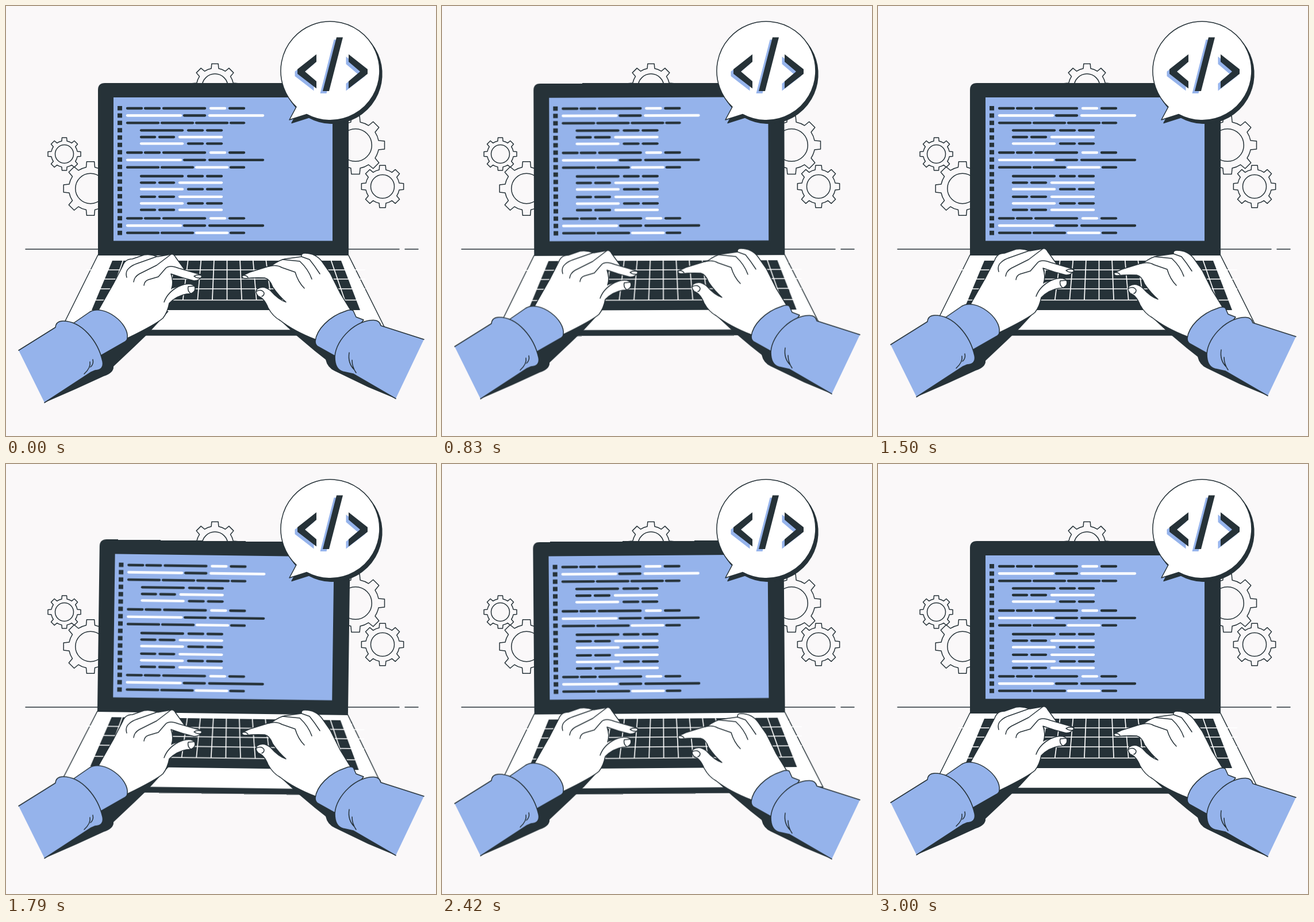
Animation of 748 by 748 pixels, one loop 3040 ms. Source, as an HTML page:

```html
<!DOCTYPE html>
<html lang="en">
<head>
<meta charset="utf-8">
<title>Typing code on a laptop</title>
<style>
  :root { --ink: #263238; --blue: #95b3eb; --paper: #faf8f9; }
  html, body { margin: 0; width: 100%; height: 100%; overflow: hidden; background: var(--paper); }
  svg { display: block; width: 100%; height: 100%; }
  .line { fill: none; stroke: var(--ink); stroke-width: 1.5; stroke-linecap: round; stroke-linejoin: round; }
  .ink { fill: var(--ink); }
  .blue { fill: var(--blue); }
  .white { fill: #fff; }
  .outlined { stroke: var(--ink); stroke-width: 1.5; stroke-linejoin: round; }
  .grid { fill: none; stroke: #fff; stroke-width: 1.7; }
  .code { stroke-width: 4.3; stroke-linecap: round; }

  #laptop, #left, #right { animation: 3.04s linear infinite; }
  #laptop { transform-origin: 378px 353px; animation-name: sway; }
  #left { animation-name: tap-left; }
  #right { animation-name: tap-right; }

  @keyframes sway {
    0%, 98.684%, 100% { transform: rotate(0deg); }
    12.336%, 61.678% { transform: rotate(1deg); }
    37.007%, 86.349% { transform: rotate(-1deg); }
  }
  @keyframes tap-left {
    0%, 16.447%, 65.789% { transform: translateY(0); }
    41.118%, 90.461% { transform: translateY(-15px); }
    98.684%, 100% { transform: translateY(-10px); }
  }
  @keyframes tap-right {
    0%, 98.684%, 100% { transform: translateY(0); }
    32.895% { transform: translateY(-10px); }
    82.237% { transform: translateY(5px); }
  }
</style>
</head>
<body>
<svg viewBox="0 0 748 748">
  <defs>
    <path id="balloon" d="M505 175.500 A86 86 0 1 1 523 188.500 L493 198 Z"/>
    <g id="tag">
      <path d="M540 84 V97 L520 114 L540 131 V143.500 L507 118 V110 Z"/>
      <path d="M575 54.500 H586 L562 148 H551 Z"/>
      <path d="M596 84 L629 110 V118 L596 143.500 V131 L616 114 L596 97 Z"/>
    </g>
  </defs>

  <path class="line" d="M34 423 H684 M694 423 H717"/>
  <g id="gears"></g>

  <g id="laptop">
    <path class="white outlined" d="M160 433 H595.500 L661 564 H95 Z"/>
    <path class="ink" d="M95 564 H661 V569 Q660 573.500 655 573.500 H101 Q95 573 95 569 Z"/>
    <path class="ink" d="M185 443 H583 L616 529 H149 Z"/>
    <path class="grid" id="keys"/>
    <path class="ink" d="M160 434 V146 Q160 134 172 134 H584 Q596 134 596 146 V434 Z"/>
    <path class="blue" d="M187 159 H568 V408.500 H187 Z"/>
    <g id="code"></g>
  </g>

  <use href="#balloon" class="ink outlined" x="4" y="5.500"/>
  <use href="#balloon" class="white outlined"/>
  <use href="#tag" class="blue" x="-4.500" y="4"/>
  <use href="#tag" class="ink"/>

  <g id="left">
    <path class="ink" d="M67 690 L122 666 L170 644 Q188 638 187 627 L222 594 L247 570 L283 531 L270 530 L205 560 L150 628 Z"/>
    <path class="white" d="M160 532 L187 483 L203 452 Q207 440 220 440 L240 433 Q252 431 264 436 L287 432 Q292 431 295 437 L311 459 L338 467 Q343 470 338 474 Q333 478 327 478 Q306 473 287 466 Q292 480 288 492 L300 488 Q316 481 325 485 Q331 488 328 495 Q325 501 314 501 Q297 504 284 517 Q281 533 273 543 Q262 553 211 578 Z"/>
    <path class="line" d="M160 530 L187 483 L203 452 Q207 440 220 440 L240 433 Q252 431 264 436 L287 432 Q292 431 295 437 L311 459"/>
    <path class="line" d="M240 486 Q241 478 248 476 L265 471 L278 456 Q285 450 300 456 L338 467 Q343 470 338 474 Q333 478 327 478 Q306 473 287 466 Q292 480 288 492"/>
    <path class="line" d="M210 472 Q207 462 214 456 Q219 451 228 448 L262 436 M222 480 Q223 471 232 466 L262 451 L287 432"/>
    <path class="line" d="M275 515 Q281 498 300 488 Q316 481 325 485 Q331 488 328 495 Q325 501 314 501 Q297 504 284 517 Q281 533 273 543 Q262 553 211 578"/>
    <path class="line" d="M341 469 Q333 466 327 470 Q332 474 339 473 M329 487 L317 488 Q315 495 321 500"/>
    <path class="blue outlined" d="M117 552 L146 532 C170 518 215 552 211 578 Q211 581 207 584 L165 608 Z"/>
    <path class="blue" d="M22 599 L86 559 Q87 548 99 548 C132 548 160 583 168 618 Q171 633 155 634 L148 637 L67 690 Z"/>
    <path class="line" d="M22 599 L86 559 Q87 548 99 548 C132 548 160 583 168 618 Q171 633 155 634 L148 637 L67 690"/>
    <path class="line" d="M136 640 Q148 629 146 619 M147 628 Q153 623 151 615"/>
  </g>

  <g id="right">
    <path class="ink" d="M678 683 L630 663 L572 635 Q559 629 556 615 L537 600 L505 573 L478 548 L530 565 L600 630 Z"/>
    <path class="white" d="M602 533 L581 499 L564 465 L550 445 Q539 430 520 430 Q513 430 514 436 L485 440 Q475 442 463 451 L424 463 L411 469 Q409 473 416 474 Q433 472 450 473 Q459 475 464 489 Q475 505 487 515 Q474 511 460 495 Q448 485 437 492 Q432 498 439 505 Q449 508 456 525 Q464 540 477 547 Q500 565 538 580 Z"/>
    <path class="line" d="M602 533 L581 499 L564 465 L550 445 Q539 430 520 430 Q513 430 514 436 L485 440 Q475 442 463 451 L424 463 L411 469 Q409 473 416 474 Q433 472 450 473 Q459 475 464 489 Q475 505 487 515 Q474 511 460 495 Q448 485 437 492 Q432 498 439 505 Q449 508 456 525 Q464 540 477 547 Q500 565 538 580"/>
    <path class="line" d="M514 436 L528 441 Q537 452 546 466 M481 441 L511 444 Q526 458 532 475 M457 453 Q470 449 480 455 L503 463 Q508 480 519 491"/>
    <path class="line" d="M411 469 Q417 467 421 472 M436 496 Q445 492 449 499 Q449 504 445 505"/>
    <path class="blue outlined" d="M622 546 L609 541 L604 530 Q599 527 590 531 C562 540 540 563 538 583 Q538 589 542 592 L576 611 Z"/>
    <path class="blue" d="M727 580 L652 556 Q650 547 640 546.500 C611 545 574 578 572 610 Q572 632 586 636 L604 640 L678 683 Z"/>
    <path class="line" d="M727 580 L652 556 Q650 547 640 546.500 C611 545 574 578 572 610 Q572 632 586 636 L604 640 L678 683"/>
    <path class="line" d="M597 603 Q594 621 606 633 M602 616 Q602 628 609 638"/>
  </g>
</svg>

<script>
  const $ = id => document.getElementById(id);

  function add(parent, tag, attrs) {
    const el = document.createElementNS("http://www.w3.org/2000/svg", tag);
    for (const key in attrs) el.setAttribute(key, attrs[key]);
    parent.append(el);
  }

  // Eight-toothed gear with outer radius r
  function gear(x, y, r) {
    const body = r * 0.8, base = 0.2, tip = 0.14;
    const at = (radius, angle) =>
      `${(x + radius * Math.cos(angle)).toFixed(2)} ${(y + radius * Math.sin(angle)).toFixed(2)}`;
    let d = "";
    for (let i = 0; i < 8; i++) {
      const a = i * Math.PI / 4;
      d += i ? `A${body} ${body} 0 0 1 ` : "M";
      d += `${at(body, a - base)} L${at(r, a - tip)} L${at(r, a + tip)} L${at(body, a + base)} `;
    }
    d += `A${body} ${body} 0 0 1 ${at(body, -base)} Z`;
    add($("gears"), "path", { d, class: "line" });
    add($("gears"), "circle", { cx: x, cy: y, r: r * 0.555, class: "line" });
  }
  gear(101.5, 257.5, 28.8);
  gear(147, 317.5, 47.3);
  gear(363.5, 140.5, 40.5);
  gear(608, 242, 51);
  gear(655, 314, 37);

  // Keyboard grid
  let grid = [459, 475, 492, 511.5].map(y => `M140 ${y} H625`).join(" ");
  for (let k = -8; k <= 8; k++) grid += ` M${384.5 + k * 22.6} 442 L${384.5 + k * 25.6} 511.5`;
  $("keys").setAttribute("d", grid);

  // Code rows: spans as start, end, with w for white
  const rows = {
    call: "209-238 240-269 272-348 354-383w 387-416",
    note: "209-306w 308-348 352-449w",
    noteDark: "209-306w 308-348 352-449",
    list: "209-267 269-327 329-387 389-416",
    listLight: "209-267 269-327 329-387w 389-416",
    head: "233-309 315-344 348-377",
    pair: "233-261 265-294 300-377w",
    tail: "233-309w 315-344 348-377"
  };
  const program = [
    [178, "call"], [190.5, "note"], [203.3, "list"],
    [216.3, "head"], [228, "pair"], [239.3, "tail"],
    [255, "call"], [267.8, "noteDark"], [280.7, "listLight"],
    [296, "head"], [307.3, "pair"], [318.7, "tail"],
    [331.8, "pair"], [343.3, "tail"], [354.7, "pair"],
    [369.3, "call"], [382, "noteDark"], [394.7, "listLight"]
  ];
  program.forEach(([y, kind], i) => {
    add($("code"), "rect", { x: 194, y: 174 + i * 12.76, width: 8, height: 7.6, class: "ink" });
    for (const span of rows[kind].split(" ")) {
      const [from, to] = span.split("-").map(parseFloat);
      add($("code"), "path", {
        d: `M${from + 2} ${y} H${to - 2}`,
        class: "code",
        stroke: span.endsWith("w") ? "#fff" : "#263238"
      });
    }
  });
</script>
</body>
</html>
```
